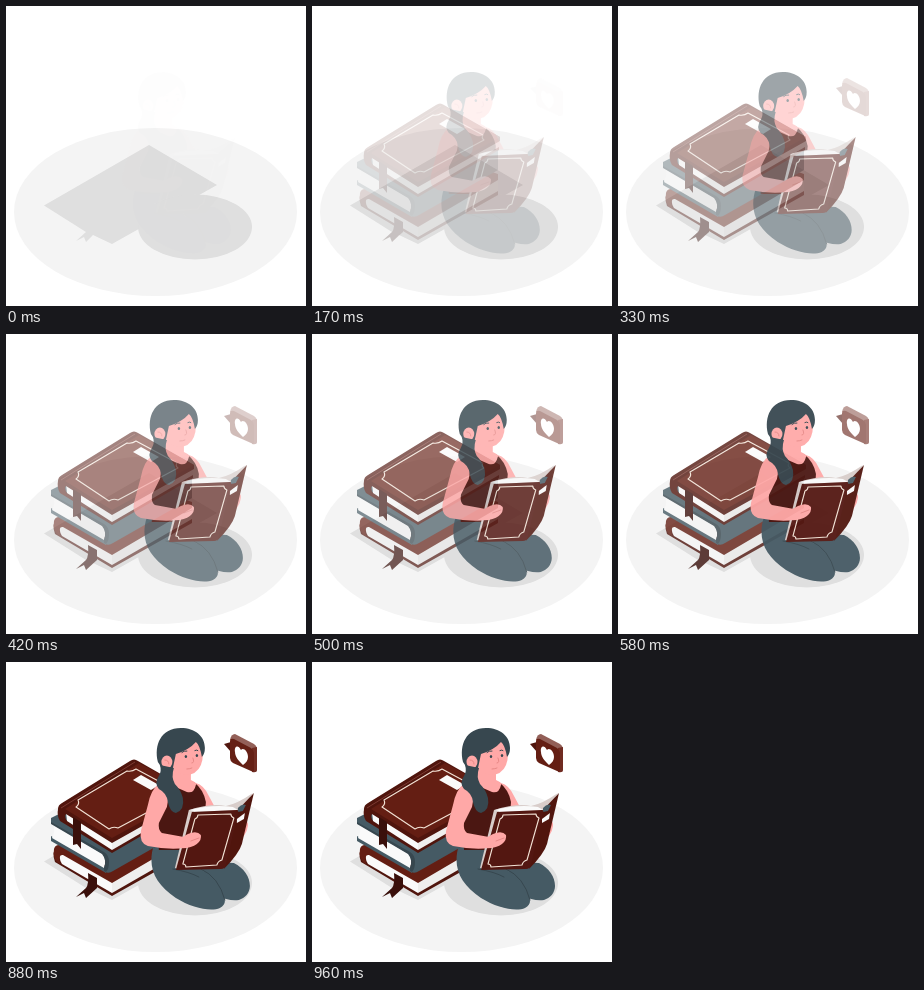
Animation of 300 by 300 pixels, one loop 1.04 s. Source, as an HTML page:

```html
<!DOCTYPE html>
<html lang="en">
<head>
<meta charset="utf-8">
<title>Reading beside a stack of books</title>
<style>
  html, body { margin: 0; width: 100%; height: 100%; overflow: hidden; background: #fff; }
  svg { display: block; width: 100vw; height: 100vh; }
  .cover { fill: #641e13; }
  .edge { fill: #50150d; }
  .dark { fill: #3a100b; }
  .slate { fill: #455a64; }
  .hair { fill: #37474f; }
  .skin { fill: #ffa8a7; }
  .page { fill: #fafafa; }
  .shade { fill: #efeeed; }
  .leaf { fill: #d8cdca; }
  .gold { fill: none; stroke: #f3e3d6; stroke-width: 1.1; stroke-linejoin: round; }
  .fold { fill: none; stroke: #37474f; stroke-width: 1; stroke-linecap: round; }
  .mark { fill: none; stroke: #e58583; stroke-width: .9; stroke-linecap: round; }
</style>
</head>
<body>
<svg viewBox="0 0 300 300">
  <ellipse cx="149.5" cy="206" rx="141.5" ry="84" fill="#f4f4f4"/>
  <g fill="#dfdfdf">
    <path d="M38 199.500L143 139L211 179L106 238L87 229L80 236L78 231L70 235L80 226Z"/>
    <ellipse cx="189" cy="221" rx="57" ry="32.500"/>
  </g>

  <g id="books">
    <!-- bottom book -->
    <path class="edge" d="M52 184Q45 189 49 200L106 234L186 189V184L106 230L58 201Z"/>
    <path class="page" d="M55 191L106 220V231L56 202Q52 196 55 191Z"/>
    <path class="shade" d="M106 220L186 174V185L106 231Z"/>
    <path class="cover" d="M48 187Q49 183 53 183L120 145L186 168V174L106 221L57 193Q52 192 54 202Q46 198 48 187Z"/>
    <path class="dark" d="M82 211L91 216V226L80 236L78 231L70 235L80 226Q83 222 82 211Z"/>
    <!-- middle book -->
    <path class="slate" d="M45 174L100 205V211L45 179Z"/>
    <path class="page" d="M47 161L97 190Q101 198 98 206L46 176Q50 169 47 161Z"/>
    <path class="slate" d="M45 156L53 152L110 140L186 141V164L107 209Q103 212 99 210V206Q102 199 97 192L45 161Z"/>
    <path class="hair" d="M45 160L98 190Q103 193 103 200Q103 207 100 210L98 209V206Q101 198 96 192L45 162Z"/>
    <!-- top book -->
    <path class="edge" d="M53 146Q50 152 54 159L106 191L187 144V140L106 187L60 158Z"/>
    <path class="page" d="M60 150L106 179V188L61 159Z"/>
    <path class="shade" d="M106 179L187 133V141L106 188Z"/>
    <path class="edge" d="M52 147Q52 143 56 141L124 99Q128 96 132 99L188 131V135L106 181L60 152Q58 154 61 160L54 157Q51 153 52 147Z"/>
    <path class="cover" d="M59 147L133 101L188 131L106 176Z"/>
    <path d="M55 146L129 100" fill="none" stroke="#7b3a32"/>
    <path class="gold" d="M70 145Q74 142 72 138L121 109Q126 110 130 107L171 129Q169 132 172 134L112 166Q107 164 103 167Z"/>
    <path class="page" d="M127 118L135 113L153 123L145 128Z"/>
    <path class="dark" d="M67 155L75 160V187L71 182L67 183Z"/>
  </g>

  <g id="reader">
    <!-- far arm and hand -->
    <path class="skin" d="M189 121Q197 123 202 134L210 149L196 154L188 139Z"/>
    <path class="skin" d="M233 160Q242 157 241 164Q240 174 227 184L224 174Z"/>
    <!-- legs -->
    <path class="slate" d="M190 199L227 201C237 206 243 215 243 224C243 231 238 236 232 238C225 239 217 237 211 234Z"/>
    <path class="slate" d="M147 183C140 205 148 222 169 236C185 246 204 250 213 246C220 242 219 236 214 231L195 207L181 186Z"/>
    <path class="fold" d="M194 207Q212 215 218 238M166 207Q183 210 192 215"/>
    <!-- top and neck -->
    <path fill="#4b1712" d="M165 122L187 120Q197 128 199 140L196 180L183 188H152Q150 171 153 151Z"/>
    <path class="skin" d="M161 105L184 107V118Q191 121 189 123Q187 132 180 130Q171 127 163 121Z"/>
    <!-- head -->
    <path class="skin" d="M163 83L194 78Q198 93 194 103Q190 113 178 113Q169 112 165 104Z"/>
    <path class="hair" d="M151 100C147 83 154 66 174 66C188 66 198 74 198 86Q198 92 195 95Q193 83 189 80Q182 88 169 92L166 106L155 106Z"/>
    <ellipse class="skin" cx="160" cy="100" rx="5.500" ry="6.500"/>
    <path class="mark" d="M158 98Q162 98 162 102M186 96Q188 101 185 101M180 107Q183 107 185 106"/>
    <g class="hair">
      <ellipse cx="179" cy="94.500" rx="1.200" ry="1.500"/>
      <ellipse cx="190" cy="93.500" rx="1.200" ry="1.500"/>
    </g>
    <path class="fold" d="M175 90.500Q177 88.500 180 89M188 88.500Q190 87.500 191 88.500"/>
    <!-- near arm -->
    <path class="skin" d="M153 121Q144 127 141 143L134 169Q132 181 141 184Q161 188 178 186Q190 186 194 178Q196 172 190 170Q184 169 177 175L155 171Q151 168 152 161L160 145L164 121Z"/>
    <!-- ponytail -->
    <path class="hair" d="M153 103Q155 109 152 114Q147 121 152 127Q160 131 161 140Q163 150 169 151Q178 148 176 136Q174 128 168 122Q164 115 167 106Z"/>
    <!-- open book -->
    <path class="leaf" d="M182 148Q205 141 219 144Q230 142 246 131L232 153H184Z"/>
    <path class="page" d="M183 148Q205 142 226 145L231 148L184 150Z"/>
    <path class="edge" d="M230 149L247 131L235 182Q232 192 217 207Z"/>
    <path class="slate" d="M231 146Q235 141 239 143L236 149L231 150Z"/>
    <path class="page" d="M230 157L238 151L237 157L230 161Z"/>
    <path class="leaf" d="M182 148L187 149L173 207L168 206Z"/>
    <path fill="#531711" d="M185 150L230 148Q232 148 231 152L219 203Q218 207 214 207L169 208Z"/>
    <path class="gold" d="M188 157Q191 156 191 153L224 152Q224 155 227 156L215 198Q211 199 210 203L179 205Q179 202 176 202Z"/>
    <!-- fingers -->
    <path class="skin" d="M170 178L181 172Q190 168 194 173Q195 178 190 182Q184 187 171 186Z"/>
    <path class="mark" d="M184 179L192 176"/>
  </g>

  <g id="bubble">
    <path fill="#925f57" d="M224 78Q225 72 229 72L248 82Q251 84 251 88L247 92Z"/>
    <path fill="#702b21" d="M246 86L251 85V108Q251 111 246 110Z"/>
    <path class="edge" d="M218 82L225 80V90Z"/>
    <path class="cover" d="M224 79Q224 76 228 77L245 86Q248 88 248 91V108Q248 111 245 109L227 101Q224 99 224 96Z"/>
    <path fill="#fff" d="M235 88C232 82 228 84 229 90C229 95 233 99 237 103C240 101 242 98 242 95C242 89 237 85 235 88Z"/>
  </g>
</svg>
<script>
  const LOOP = 1040, FPS = 24;
  const [books, reader, bubble] = ["books", "reader", "bubble"].map(id => document.getElementById(id));

  const clamp = v => Math.min(1, Math.max(0, v));
  const smooth = v => { v = clamp(v); return v * v * (3 - 2 * v); };
  const curve = (s, a, b) => 3 * (1 - s) ** 2 * s * a + 3 * (1 - s) * s * s * b + s ** 3;

  // cubic-bezier(.36, -.01, .5, 1.38): a slide with a slight overshoot
  function slide(p) {
    let lo = 0, hi = 1;
    for (let i = 0; i < 24; i++) {
      const mid = (lo + hi) / 2;
      if (curve(mid, .36, .5) < p) lo = mid; else hi = mid;
    }
    return curve(lo, -.01, 1.38);
  }

  function draw(now) {
    const step = Math.floor((now % LOOP + 6) * FPS / 1000);
    const p = step < 2 ? 1 / FPS : clamp((step + 1) / FPS);
    const y = slide(p);
    reader.setAttribute("transform", `translate(${18 * (y - 1)} 0)`);
    reader.setAttribute("opacity", clamp(y));
    books.setAttribute("opacity", step < 2 ? 0 : smooth(p * 1.12));
    bubble.setAttribute("opacity", smooth((p - .17) / .8));
  }

  const start = performance.now();
  function tick() {
    draw(performance.now() - start);
    requestAnimationFrame(tick);
  }
  tick();
</script>
</body>
</html>
```
